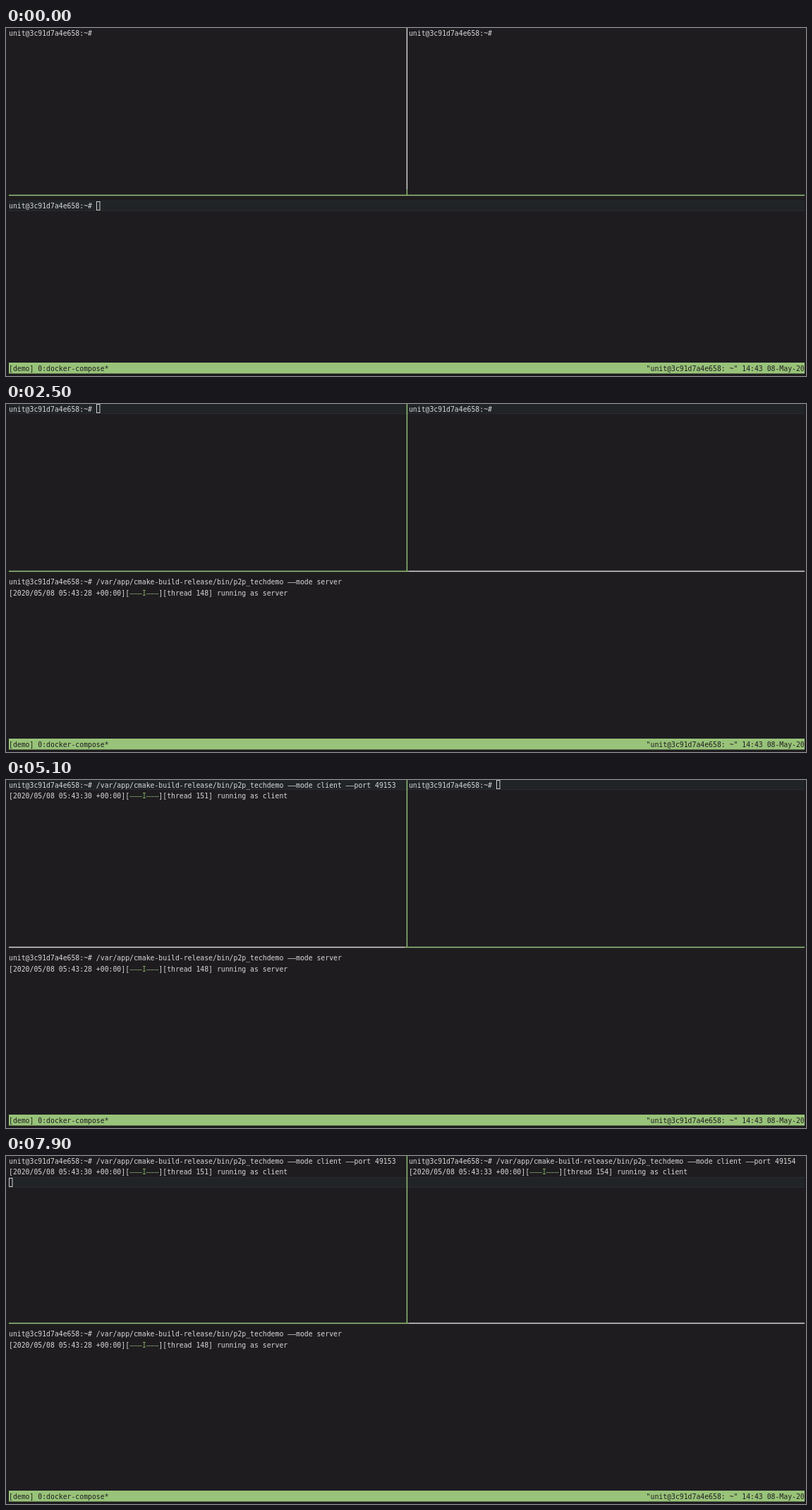
Animation of 1134 by 494 pixels, one loop 8000 ms. Source, as an HTML page with a canvas:

```html
<!DOCTYPE html>
<html lang="en">
<head>
<meta charset="utf-8">
<style>
  html, body { margin: 0; width: 100%; height: 100%; overflow: hidden; background: #1e1c1f; }
  canvas { display: block; }
</style>
</head>
<body>
<canvas width="1134" height="494"></canvas>
<script>
const ctx = document.querySelector('canvas').getContext('2d');
const LOOP = 8000, LEFT = 4, CELL = 5.906, ROW = 15.36, COLS = 191, SPLIT = 95, BORDER = 15;
const BG = '#1e1c1f', FG = '#d8d8d8', GREEN = '#98c379', LEVEL = '#86ad6a';
const HOST = 'unit@3c91d7a4e658:', PROMPT = HOST + '~# ';
const COMMAND = '/var/app/cmake-build-release/bin/p2p_techdemo --mode ';

const panes = [
  { col: 0, row: 16, start: 500, mode: 'server', args: '', second: 28, thread: 148 },
  { col: 0, row: 0, start: 3100, mode: 'client', args: ' --port 49153', second: 30, thread: 151 },
  { col: 96, row: 0, start: 5600, mode: 'client', args: ' --port 49154', second: 33, thread: 154 },
];
const focusChanges = [[0, 0], [2500, 1], [5100, 2], [7600, 1]];

const colX = col => LEFT + col * CELL;
const rowY = row => row * ROW - 0.7;

function rect(x, y, w, h, color) {
  ctx.fillStyle = color;
  ctx.fillRect(x, y, w, h);
}

// Runs of hyphens are drawn as joined dashes.
function text(str, col, row, color = FG) {
  ctx.fillStyle = color;
  ctx.fillText(str.replace(/-{2,}/g, run => '—'.repeat(run.length)), colX(col), rowY(row) + 11.2);
}

function drawCursor(pane, running) {
  const row = pane.row + (running ? 2 : 0);
  const col = pane.col + (running ? 0 : PROMPT.length);
  const y = Math.round(rowY(row)), width = COLS * CELL;
  rect(LEFT, y, width, 15, '#282b2e');
  rect(LEFT, y + 1, width, 13, '#212427');
  ctx.strokeStyle = '#cfcfcf';
  ctx.strokeRect(Math.round(colX(col)) + 0.5, y + 1.5, 4.5, 12);
}

function drawPane(pane, running) {
  const { col, row } = pane;
  text(PROMPT + (running ? COMMAND + pane.mode + pane.args : ''), col, row);
  if (!running) return;
  text(`[2020/05/08 05:43:${pane.second} +00:00][       ][thread ${pane.thread}] running as ${pane.mode}`, col, row + 1);
  text('---I---', col + 29, row + 1, LEVEL);
}

function drawBorders(focus) {
  const y = rowY(BORDER), midY = 236.7, right = colX(COLS);
  const split = colX(focus === 2 ? SPLIT : SPLIT + 1);
  rect(LEFT, midY, split - LEFT, 1.5, focus === 2 ? FG : GREEN);
  rect(split, midY, right - split, 1.5, focus === 1 ? FG : GREEN);
  rect(567.7, 0, 1.4, y, focus === 0 ? FG : GREEN);
  rect(567.7, y, 1.4, midY - y, GREEN);
}

function drawStatus() {
  rect(LEFT, 475, COLS * CELL, 15.5, GREEN);
  text('[demo] 0:docker-compose*', 0, 31, BG);
  const info = `"${HOST} ~" 14:43 08-May-20`;
  text(info, COLS - info.length, 31, BG);
}

function draw(now) {
  const t = now % LOOP;
  const focus = focusChanges.filter(([time]) => time <= t).pop()[1];
  ctx.font = '9.81px "DejaVu Sans Mono", monospace';
  rect(0, 0, 1134, 494, BG);
  drawCursor(panes[focus], t >= panes[focus].start);
  for (const pane of panes) drawPane(pane, t >= pane.start);
  drawBorders(focus);
  drawStatus();
}

function tick() {
  draw(performance.now());
  requestAnimationFrame(tick);
}
tick();
</script>
</body>
</html>
```
